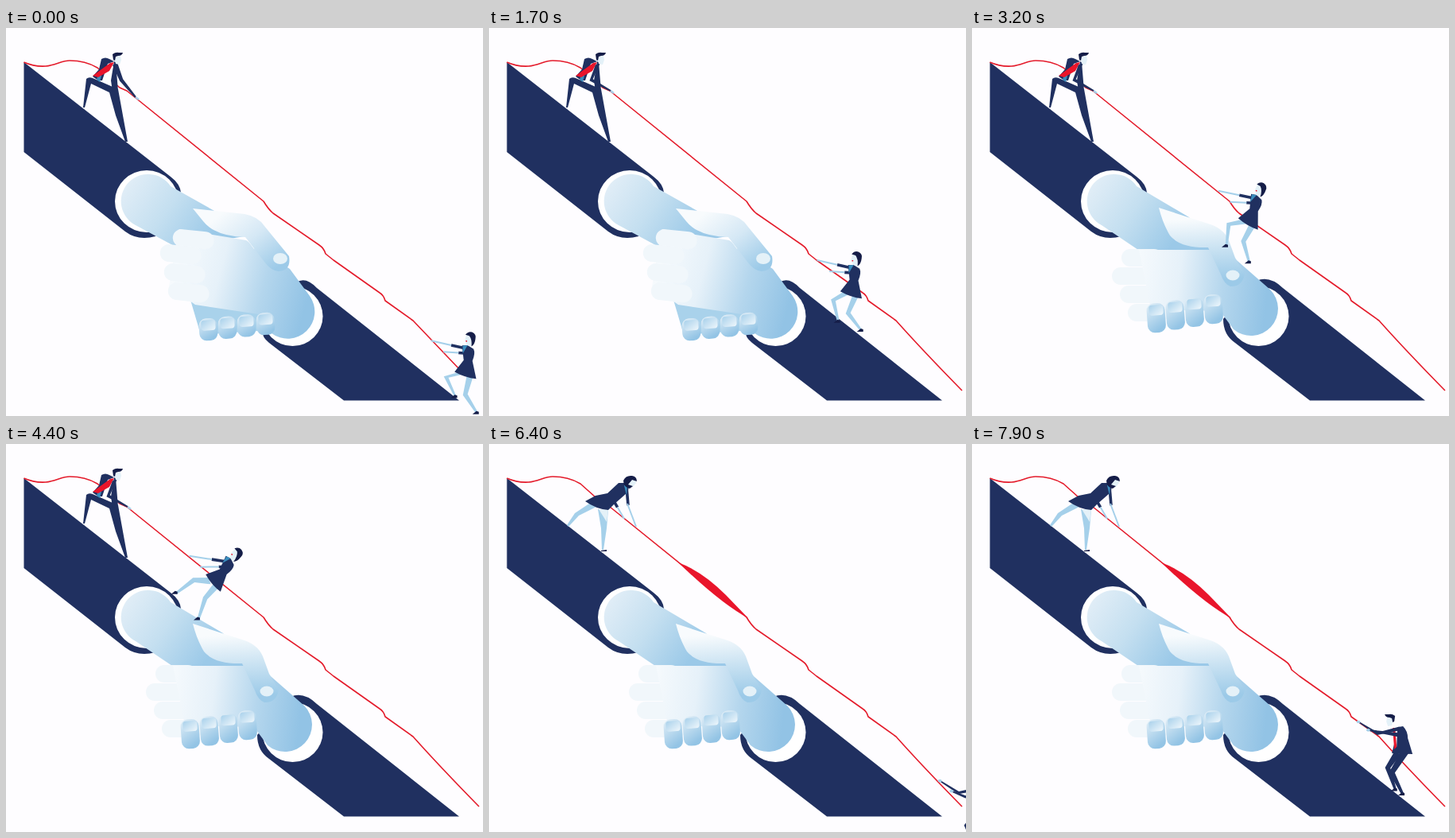
Recreate the animation shown at these times as an HTML page. Size 600 by 488 pixels, loop 8000 ms.

```html
<!DOCTYPE html>
<html>
<head>
<meta charset="utf-8">
<style>
html, body { margin: 0; width: 100%; height: 100%; overflow: hidden; background: #fefdff; }
svg { display: block; width: 600px; height: 488px; }
</style>
</head>
<body>
<svg viewBox="0 0 600 488">
  <defs id="defs"></defs>
  <path fill="#203060" d="M22.5 43L207 187Q219 196 220 207L188 262Q166 268 150 256L22.5 156Z"/>
  <ellipse cx="177" cy="218" rx="40" ry="39" fill="#fff"/>
  <g id="poseA"></g>
  <g id="poseB"></g>
  <path id="rope" fill="none" stroke="#e41b2b" stroke-width="1.6" stroke-linejoin="round"/>
  <g id="people"></g>
</svg>
<script>
const $ = id => document.getElementById(id);
const NAVY = '#203060', SKIN = '#a5d0ea', PALE = '#e4f1f8', RED = '#e9152b', HAIR = '#151d48', BLUE = '#3a8dbd';
const LOOP = 8000, BEAT = 1150;

// ---------- drawing helpers ----------
const path = (d, fill) => `<path d="${d}" fill="${fill}"/>`;
const line = (a, b, w, color) => `<path d="M${a}L${b}" stroke="${color}" stroke-width="${w}"/>`;
const disc = (x, y, rx, ry, fill) => `<ellipse cx="${x}" cy="${y}" rx="${rx}" ry="${ry}" fill="${fill}"/>`;
const pill = (x, y, w, h, r, fill, turn = 0) =>
  `<rect x="${x}" y="${y}" width="${w}" height="${h}" rx="${r}" fill="${fill}" transform="rotate(${turn} ${x} ${y})"/>`;
const place = ([x, y], turn, body) => `<g transform="translate(${x} ${y}) rotate(${turn})">${body}</g>`;
const repeat = (n, draw) => Array.from({ length: n }, (_, i) => draw(i)).join('');
const mix = (a, b, u) => a + (b - a) * u;
const add = (p, x, y) => [p[0] + x, p[1] + y];
const polar = (p, angle, r) => add(p, r * Math.sin(angle), r * Math.cos(angle));
const wave = u => .5 - .5 * Math.cos(2 * Math.PI * u);

function gradient(id, x1, y1, x2, y2, ...colors) {
  const stops = colors.map((c, i) => `<stop offset="${i / (colors.length - 1)}" stop-color="${c}"/>`).join('');
  return `<linearGradient id="${id}" gradientUnits="userSpaceOnUse"
    x1="${x1}" y1="${y1}" x2="${x2}" y2="${y2}">${stops}</linearGradient>`;
}

// ---------- handshake ----------
const palmColors = ['#f6fafd', '#e6f1f9', '#b4d6ed', '#92c3e5'];
$('defs').innerHTML =
  gradient('arm', 145, 200, 250, 275, '#e2eef7', '#c4dff0', '#9bc9e8') +
  gradient('palmA', 212, 300, 378, 345, ...palmColors) +
  gradient('palmB', 205, 310, 372, 330, ...palmColors) +
  gradient('thumbA', 275, 230, 335, 306, '#f8fbfd', '#d5e8f5', '#9ccae8') +
  gradient('thumbB', 285, 240, 290, 318, '#f8fbfd', '#c9e2f2', '#9ccae8') +
  '<linearGradient id="knuckle" x2=".4" y2="1"><stop stop-color="#e4f0f8"/><stop offset="1" stop-color="#93c4e5"/></linearGradient>' +
  '<linearGradient id="nail" x2="1" y2="1"><stop stop-color="#a9d1eb"/><stop offset="1" stop-color="#eff7fc"/></linearGradient>';

const knuckle = (x, y, h) =>
  pill(x - 12, y, 23, h, 9, 'url(#knuckle)', -4) + pill(x - 9, y + 2, 18, 13, 4, 'url(#nail)', -4);
const finger = (x, y, turn) => pill(x, y, 52, 22, 11, '#f1f7fb', turn);
const rightCuff = disc(360.5, 362.5, 38, 37.5, '#fff');

$('poseA').innerHTML =
  path('M207 199L262 230L300 262L215 276L163 248A34 34 0 1 1 207 199Z', 'url(#arm)') +
  path('M365 320Q377 312 391 327L570 468.4H425L331 396Q322 389 322 380Z', NAVY) + rightCuff +
  path('M232 342L320 352L330 380L245 386Z', '#a9d2eb') +
  path('M218 253L302 267L357 303L382 337A34 34 0 0 1 334 384L318 360L238 348L205 325L214 272Z', 'url(#palmA)') +
  finger(211, 252, 6) + repeat(3, i => finger(195 + 5 * i, 271 + 24 * i, 6)) +
  path('M300 262L318 270L312 278Z', '#fff') +
  path('M235 227L300 234Q317 237 325 249L356 287Q359 305 343 306Q333 305 325 294L301 263Q263 262 248 243Z', 'url(#thumbA)') +
  disc(345, 290, 9, 7, PALE) + repeat(4, i => knuckle(254 + 24 * i, 366 - 2.4 * i, 28));

$('poseB').innerHTML =
  path('M207 199L273 238L310 281H212L163 248A34 34 0 1 1 207 199Z', 'url(#arm)') +
  path('M358 318Q374 311 391 327L570 468.4H425L331 396Q316 386 316 366Z', NAVY) + rightCuff +
  repeat(4, i => finger(i ? 166 + 10 * i : 188, 278 + 23 * i, 0)) +
  path('M210 279H300L326 286L375 329A34 34 0 0 1 329 379L312 356L225 354Z', 'url(#palmB)') +
  path('M235 226L300 247Q317 253 323 267L331 289L343 309Q340 326 325 325Q317 322 313 310L297 276Q262 277 249 261Q240 246 235 226Z', 'url(#thumbB)') +
  disc(328, 311, 8.5, 6.5, PALE) + repeat(4, i => knuckle(231 + 24 * i, 347 - 3.7 * i, 37));

// ---------- figures ----------
// Bent joint between a and b for bones of length m and n.
function joint(a, b, m, n, side) {
  const dx = b[0] - a[0], dy = b[1] - a[1], d = Math.hypot(dx, dy);
  const along = Math.max(-m, Math.min(m, (m * m - n * n + d * d) / (2 * d)));
  const out = side * Math.sqrt(m * m - along * along);
  return add(a, (dx * along - dy * out) / d, (dy * along + dx * out) / d);
}

// Two bones tapering from w to a third of it.
function limb(a, b, m, n, side, w, color) {
  const k = joint(a, b, m, n, side);
  const angle = Math.atan2(b[1] - a[1], b[0] - a[0]);
  const edge = (p, r) => polar(p, -angle, r);
  const pts = [edge(a, w / 2), edge(k, w / 3), edge(b, w / 6), edge(b, -w / 6), edge(k, -w / 3), edge(a, -w / 2)];
  return path('M' + pts.join('L') + 'Z', color);
}
const shoe = p => place(p, 0, path('M-1 -3L2 -2V1H-6Z', HAIR));

// The sleeve covers the first part of the arm, the rest is bare.
function arm(a, b, sleeve) {
  const cuff = [mix(a[0], b[0], sleeve), mix(a[1], b[1], sleeve)];
  return line(a, cuff, 3.6, NAVY) + line(cuff, b, 2, SKIN);
}

const manHead = path('M-4 0L4 -1L5 4L3 10L-2 9Z', PALE) +
  path('M-6 -3Q-2 -6 2 -5L7 -5Q6 -1 1 -1L-2 0L-3 5L-5 4Z', HAIR);
const womanHead = path('M-5 -3L1 -3L3 11L-3 10L-6 4Z', PALE) +
  path('M-6 -3Q-3 -8 2 -7Q8 -5 7 1Q7 8 3 11Q3 2 -1 -2Z', HAIR) + disc(-4, 5, 1, .8, RED);

const womanBody = path('M-8 -36L-1 -37L7 -33Q10 -28 7 -18L14 4Q0 4 -14 -2L-4 -18Z', NAVY) +
  path('M-7 -36L-1 -37L-6 -26Z', BLUE) + place([1, -47], 0, womanHead);

function climbingWoman(t) {
  const gait = wave(t / BEAT);
  const lean = .1 + .55 * Math.max(0, (t - 1200) / 3200) ** 2;
  const hip = [578 - .072 * t, 436 - .0595 * t];
  const neck = polar(hip, Math.PI - lean, 35), head = polar(hip, Math.PI - lean, 47);
  const rear = polar(hip, .42 - 1.25 * lean, 51 - 3 * gait);
  const front = polar(hip, -.25 - 1.6 * lean, 28 + 30 * lean + 7 * gait);
  return limb(add(hip, 6, 1), rear, 25, 28, 1, 9, SKIN) + shoe(rear) +
    limb(add(hip, -5, -2), front, 20, 28, 1, 9, SKIN) + shoe(front) +
    arm(add(neck, -3, 2), add(head, -46 - 20 * lean, 4), .42) +
    arm(add(neck, -2, 8), add(head, -30 - 24 * lean, 18), .35) +
    place(hip, lean * 180 / Math.PI, womanBody);
}

const manBody = path('M4 12L16 10Q22 16 22 25L28 45L2 44L6 28Z', NAVY) +
  path('M1 10L9 11L8 36Z', '#fff') + path('M3 12L6 12L8 36L5 39Z', RED) +
  `<g transform="scale(-1 1)">${manHead}</g>`;

function climbingMan(t) {
  const since = (t - 7200) / 1000, lift = 1 - wave(since * 1000 / BEAT);
  const head = [564 - 54 * since, 380 - 50 * since], hip = add(head, 14, 45);
  const front = add(hip, mix(-6, -18, lift), mix(47, 35, lift));
  const rear = add(hip, mix(1, 9, lift), mix(50, 60, lift));
  const hands = [add(head, -40, 5 - 4 * lift), add(head, mix(-29, -18, lift), mix(14, 22, lift))];
  return limb(add(hip, 4, -2), rear, 30, 31, 1, 11, NAVY) + shoe(rear) +
    limb(add(hip, -5, -1), front, 22, 30, 1, 10, NAVY) + shoe(front) +
    place(head, 0, manBody) +
    hands.map((h, i) => limb(add(head, 11, 13 + 8 * i), h, 28 - 9 * i, 28 - 9 * i, -1, 5, NAVY) + disc(...h, 2.5, 1.8, SKIN)).join('');
}

function pullingMan(reach) {
  const hand = [mix(153, 163, reach), mix(79, 87, reach)];
  return path('M101 64Q104 61 109 63L141 77L153 143L150 143L138 110L130 81L107 70L99 100L97 100Z', NAVY) +
    path('M120 39Q125 36 130 39L138 43L141 79L134 80L132 66L116 66L109 61L117 52Z', NAVY) +
    path('M128 45L136 42L132 66L121 66Z', '#fff') + path('M116 58L120 60L118 68L114 65Z', BLUE) +
    path('M136 43L131 44L109 60L116 62L130 54Z', RED) +
    limb([137, 45], hand, 22, 28, 1, 7, NAVY) + line(hand, add(hand, 4, 3), 2.5, SKIN) +
    place([140, 36], 0, manHead);
}

const pullingWoman = path('M126 75L135 79L113 90L100 104L98 102L108 87Z', SKIN) +
  path('M137 82L150 82L148 106L144 133L142 133L141 106Z', SKIN) + path('M138 82L150 82L148 98Z', PALE) +
  path('M141 134L148 133V135H141Z', HAIR) +
  arm([156, 70], [170, 94], .4) + arm([173, 54], [175, 77], 1) + arm([174, 75], [185, 104], 0) +
  path('M163 49L174 49Q178 55 173 62L157 76L150 83Q135 82 121 72L134 65L149 62Z', NAVY) +
  path('M170 52L174 51L173 65Z', BLUE) + path('M174 44L184 44L185 49L181 54L175 53Z', PALE) +
  path('M169 46Q172 39 180 40Q186 41 186 47L180 45L175 51L181 53L177 56Q169 54 169 46Z', HAIR);

// ---------- scene ----------
const ropePath = 'M22.5 43Q36 49 50 48C62 47 70 41 80 41Q100 41 115 50L143 75L152 79L324 218Q330 228 336 233L394 273Q400 277 402 284L412 292L470 333Q475 336 477 343L512 368';
const ropeSwell = path('M238 149Q268 160 298 190L326 219Q292 201 238 149Z', RED);

function draw(t) {
  const phase = t % BEAT / BEAT, grip = phase < .56;
  $('poseA').style.display = grip ? '' : 'none';
  $('poseB').style.display = grip ? 'none' : '';
  $('rope').setAttribute('d', ropePath + (t < 300 ? 'L573 432' : 'Q545 405 595 456'));
  const reach = Math.max(0, Math.cos(2 * Math.PI * phase));
  $('people').innerHTML =
    t < 5200 ? pullingMan(phase > .5 ? 0 : reach) + climbingWoman(t) :
    t >= 5500 ? ropeSwell + pullingWoman + climbingMan(t) : '';
}

const start = performance.now();
function tick() {
  draw((performance.now() - start) % LOOP);
  requestAnimationFrame(tick);
}
tick();
</script>
</body>
</html>
```
